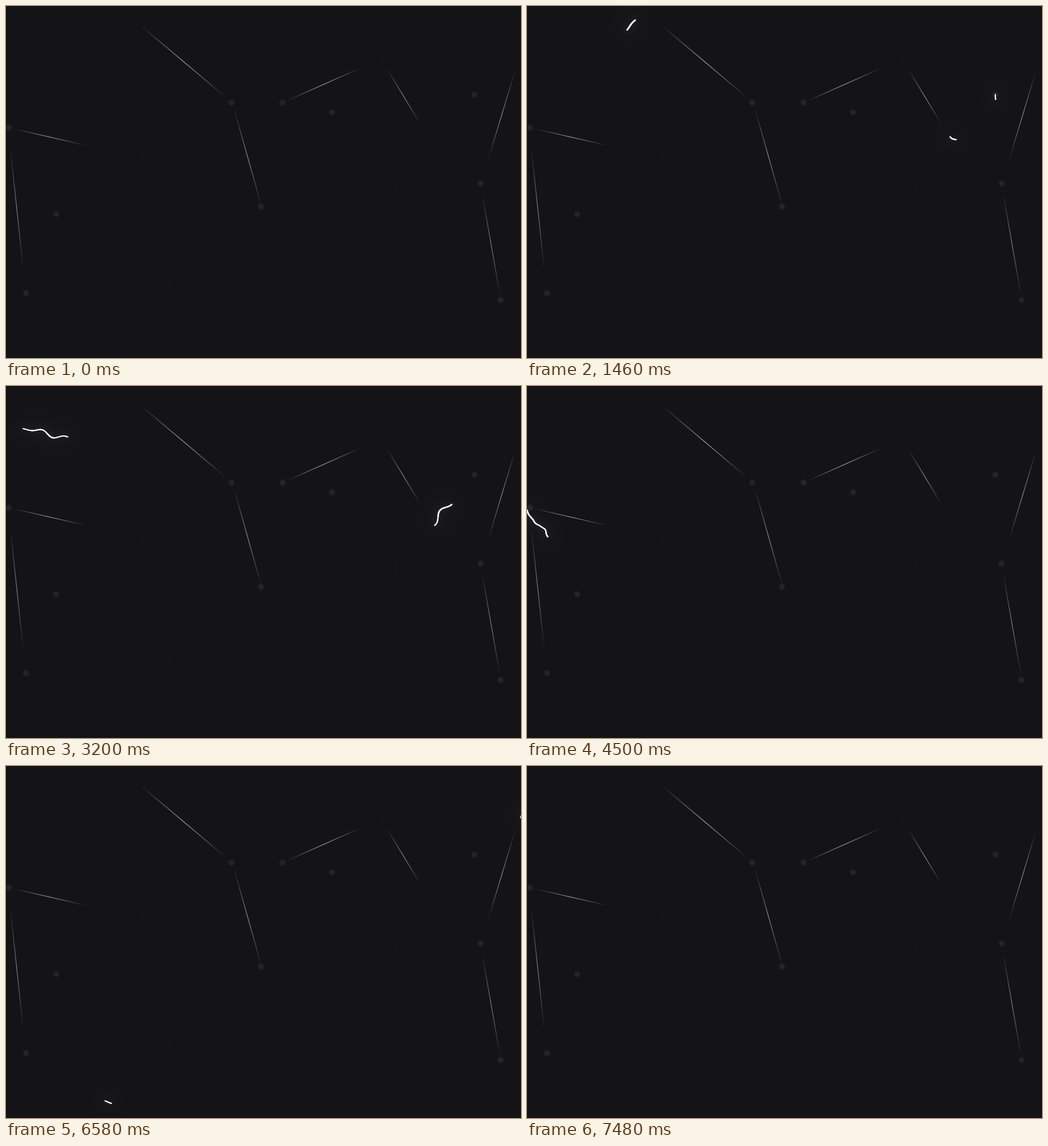
An HTML page with a canvas that plays this animation: 905x619 px, repeating every 8000 ms.

```html
<!DOCTYPE html>
<html lang="en">
<head>
<meta charset="utf-8">
<title>Lightning constellation</title>
<style>
html, body { margin: 0; width: 100%; height: 100%; overflow: hidden; background: #141416; }
canvas { display: block; width: 905px; height: 619px; }
</style>
</head>
<body>
<canvas width="905" height="619"></canvas>
<script>
const ctx = document.querySelector('canvas').getContext('2d');
const LOOP = 8000;

const pairs = s => s.split(' ').map(p => p.split(',').map(Number));
const clamp = v => Math.min(1, Math.max(0, v));

const stars = pairs('5,214 88,366 35,505 396,170 448,353 486,170 573,187 823,156 834,312 869,517');
const faintStars = pairs('240,268 288,486 660,94 684,321');
const lines = [
  '240,37 385,159.5', '401,182 448.5,350', '495,166 622,109.5', '671,113 727,205.5',
  '894,116 848,268', '837,331 868,508', '16,216.5 138,244.5', '8,254 30,460'
].map(pairs);

// Samples about 1px apart along the nodes, waving sideways and then softened.
function trace(nodes, seed) {
  const raw = [nodes[0]];
  let s = 0;
  for (let i = 1; i < nodes.length; i++) {
    const [x0, y0] = nodes[i - 1], [x1, y1] = nodes[i];
    const dx = x1 - x0, dy = y1 - y0, len = Math.hypot(dx, dy), n = Math.round(len);
    const amp = Math.min(5, len / 16);
    for (let j = 1; j <= n; j++) {
      const k = j / n;
      s++;
      const off = amp * Math.sin(Math.PI * k) * (.7 * Math.sin(s / 6.5 + seed) + .6 * Math.sin(s / 11 + 2 * seed));
      raw.push([x0 + dx * k - dy / len * off, y0 + dy * k + dx / len * off]);
    }
  }
  return raw.map((p, i) => {
    const r = Math.min(4, i, raw.length - 1 - i);
    const near = raw.slice(i - r, i + r + 1);
    return [0, 1].map(c => near.reduce((sum, q) => sum + q[c], 0) / near.length);
  });
}

const knee = '47,278 50,310 85,368 ';
const northWest = '240,261 116,92 190,25';
const paths = {
  west: '3,200 28,246 22,270 ' + knee + '122,348 ' + northWest,
  westLow: '0,218 14,242 33,252 34,262 ' + knee + northWest,
  arch: '487,163 545,138 578,131 588,109 662,88 657,100 686,150 711,160 704,180 745,233 754,235',
  zigzag: '174,589 190,594 212,588 209,553 245,537 291,488 237,464 232,440 190,442 148,412 146,388 85,368 205,284 230,288 240,261 116,92 30,75',
  east: '908,80 886,148 858,194 832,280 831,301 817,324 836,380 869,517 684,321 823,156',
  hook: '823,156 831,210 825,265 828,296 820,322 832,298 847,222 867,186 895,110 905,91',
  rise: '873,522 861,503 865,486 834,312 823,156',
  centre: '396,170 573,187 463,347 437,355'
};

// The head needs `grow` ms for the path; the tail leaves after `lag` ms and arrives at `dur`.
const bolt = (name, start, grow, lag, dur, width = 2.3, lead = 10) =>
  ({ pts: trace(pairs(paths[name]), name.length), start, grow, lag, dur, width, lead });

const bolts = [
  bolt('centre', 320, 300, 150, 600, 4),
  bolt('west', 700, 462, 180, 780, 2.6),
  bolt('arch', 700, 360, 180, 780, 2.6),
  bolt('rise', 850, 390, 180, 620),
  bolt('zigzag', 2520, 386, 260, 720, 2),
  bolt('east', 2520, 740, 245, 740),
  bolt('westLow', 4500, 330, 200, 530, 2.4, 61),
  bolt('arch', 4740, 300, 300, 1080),
  bolt('hook', 4800, 300, 165, 715, 1.9),
  bolt('zigzag', 6580, 386, 260, 740, 2),
  bolt('east', 6580, 740, 245, 900)
];

function disc([x, y], r, fill) {
  ctx.fillStyle = fill;
  ctx.beginPath();
  ctx.arc(x, y, r, 0, 7);
  ctx.fill();
}

function drawStar(p) {
  disc(p, 6, '#1c1c1f');
  disc(p, 4.4, '#252528');
}

function drawLine([[x0, y0], [x1, y1]]) {
  const peak = .55 + .2 * Math.abs(x1 - x0) / Math.hypot(x1 - x0, y1 - y0);
  const g = ctx.createLinearGradient(x0, y0, x1, y1);
  [.04, .55, 1, .55, .04].forEach((a, i) => g.addColorStop(i / 4, `rgba(222,222,228,${a * peak})`));
  ctx.strokeStyle = g;
  ctx.lineWidth = 1.15;
  ctx.beginPath();
  ctx.moveTo(x0, y0);
  ctx.lineTo(x1, y1);
  ctx.stroke();
}

function drawBolt({ pts, start, grow, lag, dur, width, lead }, t) {
  const age = t - start, last = pts.length - 1;
  if (age < 0 || age >= dur) return;
  const head = Math.min(last, Math.round(lead + last * age / grow));
  const tail = Math.round(last * clamp((age - lag) / (dur - lag)));
  if (head <= tail) return;

  ctx.strokeStyle = '#fff';
  ctx.lineWidth = width * .8;
  ctx.beginPath();
  for (let i = tail; i <= head; i++) ctx.lineTo(...pts[i]);
  for (const [blur, alpha] of [[34, .4], [12, .3]]) {
    ctx.shadowColor = `rgba(150,158,205,${alpha})`;
    ctx.shadowBlur = blur;
    ctx.stroke();
  }
  ctx.shadowBlur = 0;

  // Uneven thickness with an occasional swelling.
  for (let i = tail; i <= head; i++) {
    const swell = Math.max(0, Math.sin(i / 24 + width)) ** 16;
    disc(pts[i], width / 2 * (1 + .12 * Math.sin(i / 9) + .5 * swell), '#fff');
  }
}

function draw(t) {
  ctx.fillStyle = '#141416';
  ctx.fillRect(0, 0, 905, 619);
  faintStars.forEach(p => disc(p, 3.5, '#18181a'));
  stars.forEach(drawStar);
  lines.forEach(drawLine);
  bolts.forEach(b => drawBolt(b, t));
}

ctx.lineJoin = ctx.lineCap = 'round';
const origin = performance.now();
(function frame() {
  draw((performance.now() - origin) % LOOP);
  requestAnimationFrame(frame);
})();
</script>
</body>
</html>
```
